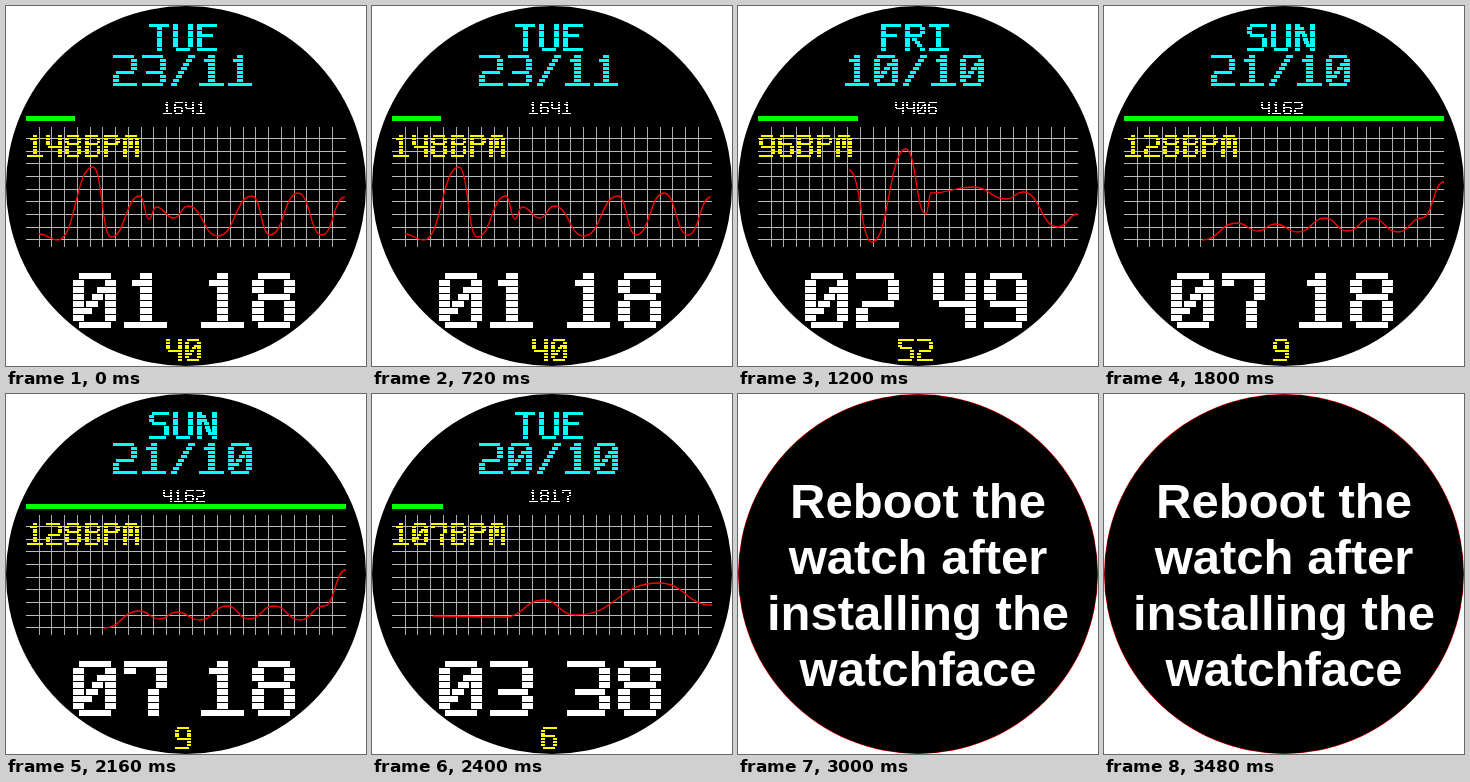
Animation, 360 px wide and 360 px high, one loop 3.8 s. Source, as an HTML page with a canvas:

```html
<!DOCTYPE html>
<html lang="en">
<head>
<meta charset="utf-8">
<title>Watch face</title>
<style>
  html, body { margin: 0; width: 100%; height: 100%; overflow: hidden; background: #fff; }
  canvas { display: block; }
</style>
</head>
<body>
<canvas id="stage" width="360" height="360"></canvas>
<script>
const ctx = document.getElementById('stage').getContext('2d');
const LOOP = 3800;

// Pen paths of the scanline font: columns a to e, rows 0 to 7. Turns are rounded.
const GLYPHS = {
  0: 'a3a0e0e7a7a3 d2b5',
  1: 'b1c1 c0c7 a7e7',
  2: 'a0e0e4a4a7 a7e7',
  3: 'a0e0e4b4 e5e7a7',
  4: 'a0a4e4 e0e7',
  5: 'e0a0 a0a3e3e7a7',
  6: 'e0a0a7e7e3a3',
  7: 'a0a1 a0e0 e0e3 d4d7',
  8: 'a2a0e0e3a3a1 a4a7e7e4',
  9: 'a7e7e0a0a4e4',
  '/': 'e0a7',
  B: 'a0a7 a0e0e3a3 e4e7a7',
  E: 'a0e0 a0a7 a7e7 a3d3',
  F: 'a0e0 a0a7 a3d3',
  I: 'a0e0 c0c7 a7e7',
  M: 'a7a0e0e7 c1c4',
  N: 'a0a7 b1d6 e0e7',
  P: 'a0a7 a0e0e3a3',
  R: 'a0a7 a0e0e3a3 c4e7',
  S: 'e0a0a3e3e7a7',
  T: 'a0e0 c0c7',
  U: 'a0a7e7e0'
};

// Each pulse names only the peaks and valleys of its curve.
const FACES = [
  { until: 1200, day: 'TUE', date: '23/11', steps: '1641', bar: 49, bpm: '148BPM',
    hour: '01', minute: '18', second: '40',
    pulse: [[33, 228], [52, 234], [87, 161], [105, 231], [134, 190], [143, 213], [150, 201],
      [168, 212], [182, 200], [212, 230], [246, 190], [264, 229], [292, 187], [316, 229], [339, 191]] },
  { until: 1800, day: 'FRI', date: '10/10', steps: '4406', bar: 100, bpm: '96BPM',
    hour: '02', minute: '49', second: '52',
    pulse: [[111, 164], [134, 236], [168, 143], [188, 208], [193, 187], [235, 181], [269, 193],
      [285, 186], [320, 221], [340, 208]] },
  { until: 2400, day: 'SUN', date: '21/10', steps: '4162', bar: 320, bpm: '128BPM',
    hour: '07', minute: '18', second: '9',
    pulse: [[98, 234], [133, 217], [154, 225], [171, 218], [194, 226], [221, 212], [243, 225],
      [268, 212], [294, 226], [318, 212], [340, 176]] },
  { until: 3000, day: 'TUE', date: '20/10', steps: '1817', bar: 51, bpm: '107BPM',
    hour: '03', minute: '38', second: '6',
    pulse: [[61, 222], [133, 223], [171, 206], [203, 221], [287, 189], [340, 211]] }
];

function rect(color, x, y, w, h) {
  ctx.fillStyle = color;
  ctx.fillRect(x, y, w, h);
}

function disc(color, r) {
  ctx.fillStyle = color;
  ctx.beginPath();
  ctx.arc(180, 180, r, 0, 7);
  ctx.fill();
}

// Calls bar(from, to, row) for every scanline piece of one pen path.
function tracePath(path, bar) {
  const points = path.match(/../g).map(p => [p.charCodeAt(0) - 97, +p[1]]);
  for (let k = 1; k < points.length; k++) {
    const [x1, r1] = points[k - 1], [x2, r2] = points[k];
    const turnIn = +(k > 1), turnOut = +(k < points.length - 1);
    const dx = x2 - x1, dr = r2 - r1;
    if (dr === 0) {
      const inset = .7 * Math.sign(dx);
      const ends = [x1 + inset * turnIn, x2 - inset * turnOut];
      bar(Math.min(...ends), Math.max(...ends), r1);
    } else {
      const count = Math.abs(dr);
      for (let i = turnIn; i <= count - turnOut; i++) {
        const x = x1 + dx * i / count;
        bar(x, x, r1 + dr * i / count);
      }
    }
  }
}

function write(text, color, y, pitch, row, x = 179 - text.length * pitch / 2) {
  const stem = pitch * .23, unit = pitch * .155;
  const thick = Math.round(row * .8);
  [...text].forEach((char, n) => {
    const left = x + n * pitch;
    for (const path of GLYPHS[char].split(' ')) {
      tracePath(path, (from, to, r) => {
        const start = Math.round(left + from * unit);
        const end = Math.floor(left + to * unit + stem);
        rect(color, start, Math.round(y + r * row), end - start, thick);
      });
    }
  });
}

function drawGrid() {
  for (let i = 1; i < 25; i++) rect('#aaa', Math.floor(20.4 + i * 12.75), 121, 1, 120);
  for (let i = 1; i < 10; i++) rect('#bbb', 20, Math.floor(119.65 + i * 12.7), 320, 1);
}

function drawPulse(points) {
  ctx.beginPath();
  ctx.moveTo(...points[0]);
  for (let i = 1; i < points.length; i++) {
    const [x0, y0] = points[i - 1], [x, y] = points[i];
    const mid = (x0 + x) / 2;
    ctx.bezierCurveTo(mid, y0, mid, y, x, y);
  }
  ctx.strokeStyle = '#f00';
  ctx.lineWidth = 1.3;
  ctx.stroke();
}

function drawFace(face) {
  disc('#000', 180);
  write(face.day, '#0ff', 18, 23.8, 3.4);
  write(face.date, '#0ff', 49, 28.9, 4);
  write(face.steps, '#fff', 96, 11.1, 1.5);
  rect('#0f0', 20, 110, face.bar, 5);
  drawGrid();
  drawPulse(face.pulse);
  write(face.bpm, '#ff0', 129, 19.2, 2.8, 21);
  write(face.hour, '#fff', 267, 51.3, 7, 67);
  write(face.minute, '#fff', 267, 51.3, 7, 195);
  write(face.second, '#ff0', 333, 19.2, 2.8);
}

function drawNotice() {
  disc('#f00', 180);
  disc('#000', 179.5);
  ctx.fillStyle = '#fff';
  ctx.font = 'bold 49px "Liberation Sans", Arial, sans-serif';
  ctx.textAlign = 'center';
  ['Reboot the', 'watch after', 'installing the', 'watchface']
    .forEach((line, i) => ctx.fillText(line, 180, 124 + i * 56));
}

const startTime = performance.now();
function tick() {
  const time = (performance.now() - startTime) % LOOP;
  const face = FACES.find(f => time < f.until);
  rect('#fff', 0, 0, 360, 360);
  if (face) drawFace(face);
  else drawNotice();
  requestAnimationFrame(tick);
}
tick();
</script>
</body>
</html>
```
